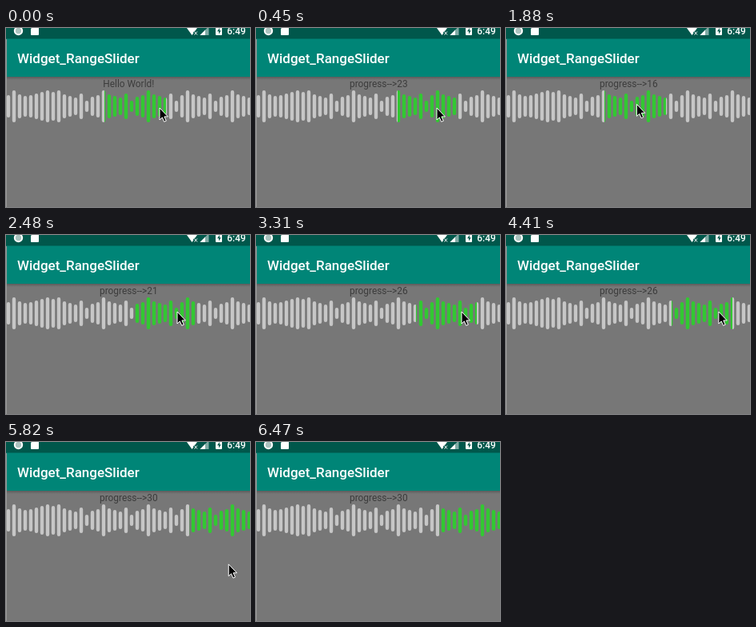
These frames come from a looping animation (305 by 224 pixels, 6570 ms). An HTML page:

```html
<!DOCTYPE html>
<html lang="en">
<head>
<meta charset="utf-8">
<title>Range slider</title>
<style>
  html, body { margin: 0; width: 100%; height: 100%; overflow: hidden; background: #777; }
  svg { display: block; font-family: Roboto, sans-serif; }
</style>
</head>
<body>
<svg width="305" height="224" viewBox="0 0 305 224">
  <defs>
    <linearGradient id="shade" x2="0" y2="1">
      <stop stop-color="#5c5c5c"/>
      <stop offset="1" stop-color="#777"/>
    </linearGradient>
    <!-- hard stops colour the bars inside the selected range -->
    <linearGradient id="range" gradientUnits="userSpaceOnUse" x1="0" x2="76.25">
      <stop stop-color="#c6c6c6"/>
      <stop stop-color="#32c832"/>
      <stop offset="1" stop-color="#32c832"/>
      <stop offset="1" stop-color="#c6c6c6"/>
    </linearGradient>
  </defs>

  <rect width="305" height="224" fill="#777"/>
  <rect y="61" width="305" height="4" fill="url(#shade)"/>
  <rect width="305" height="61" fill="#008577"/>
  <rect y="14" width="1" height="210" fill="#999"/>
  <rect width="305" height="13.5" fill="#00574b"/>

  <!-- status icons -->
  <g fill="#fff">
    <circle cx="15.5" cy="3.5" r="4.7" fill="#a9c2be" stroke="#fff" stroke-width="2"/>
    <path d="M31 8V1l3-3h7V8q0 1-1 1h-8q-1 0-1-1z"/>
    <path d="M226 0h13l-6.5 9z"/>
    <path d="M235 4.5l4 4m0-4l-4 4" stroke="#00574b" stroke-width="3"/>
    <path d="M235.500 4.500l3.500 4m0-4l-3.500 4" stroke="#fff"/>
    <path d="M242.500 9L253.500-2V9z" opacity=".5"/>
    <path d="M242.500 9L249 2.500V9z"/>
    <rect x="262" y="-2" width="8" height="11" rx="1"/>
    <path d="M267 0l-3 4.300h2V7.500l2.800-4.300h-1.800z" fill="#00574b"/>
    <text x="276.300" y="8" font-size="11.860" font-weight="500">6:49</text>
    <text x="14" y="44" font-size="17" font-weight="500">Widget_RangeSlider</text>
  </g>

  <text id="label" x="153.300" y="74" font-size="11.860" text-anchor="middle" fill="#3c3c3c"></text>
  <path id="bars" fill="none" stroke="url(#range)" stroke-width="4.400" stroke-linecap="round"/>
  <path id="cursor" d="M1 0V15l3.300-3.100 2.400 5.400 2.600-1.100-2.400-5.300h4.500z" fill="#000" stroke="#fff"/>
</svg>
<script>
const LOOP = 6570, STEP = 30, UNIT = 305 / 40, LAST = 30 * UNIT;
const $ = id => document.getElementById(id);

// half height of a bar: a repeating motif with one swell near the start
const motif = [20, 15, 13, 11, 16, 7, 12, 14];
function barHeight(i) {
  const beat = Math.floor((i - 9) * 32 / 31 + 0.3);
  return Math.max(motif[beat & 7], 20 - 2 * Math.abs(i - 7));
}

const bars = Array.from({ length: 44 }, (_, i) => {
  const h = barHeight(i) - 2.2;
  return `M${3 + 7 * i} ${98 - h}v${2 * h}`;
});
$('bars').setAttribute('d', bars.join(''));

// pointer moves; those with a left value drag the range along
const start = { x: 191, y: 100, left: 123.3 };
const moves = [
  { from: 20, to: 270, x: 225, y: 100, left: 177 },
  { from: 930, to: 1030, x: 222, y: 94 },
  { from: 1240, to: 1520, x: 160, y: 95, left: 123.3 },
  { from: 1880, to: 1990, x: 172, y: 97 },
  { from: 2260, to: 2480, x: 213, y: 96, left: 161 },
  { from: 3100, to: 3310, x: 256, y: 96, left: 200 },
  { from: 4270, to: 4890, x: 295, y: 96, left: LAST },
  { from: 5610, to: 6130, x: 255, y: 224 }
];
const releases = [450, 1520, 2480, 3310, 4980];

function pose(t) {
  let now = start;
  for (const { from, to, ...end } of moves) {
    if (t < from) break;
    const steps = Math.round((to - from) / STEP) + 1;
    const done = t >= to ? steps : Math.floor((t - from) / STEP) + 1;
    const k = Math.min(1, done / steps);
    const mix = key => now[key] + ((end[key] ?? now[key]) - now[key]) * k;
    now = { x: mix('x'), y: mix('y'), left: mix('left') };
  }
  return now;
}

function draw(t) {
  const { x, y, left } = pose(t);
  $('range').setAttribute('gradientTransform', `translate(${left})`);
  $('cursor').setAttribute('transform', `translate(${x} ${y})`);
  const released = releases.filter(r => r <= t).pop();
  $('label').textContent = released === undefined
    ? 'Hello World!'
    : 'progress-->' + Math.floor(pose(released).left / UNIT + 1e-6);
}

const begin = performance.now();
function tick() {
  draw((performance.now() - begin) % LOOP);
  requestAnimationFrame(tick);
}
tick();
</script>
</body>
</html>
```
